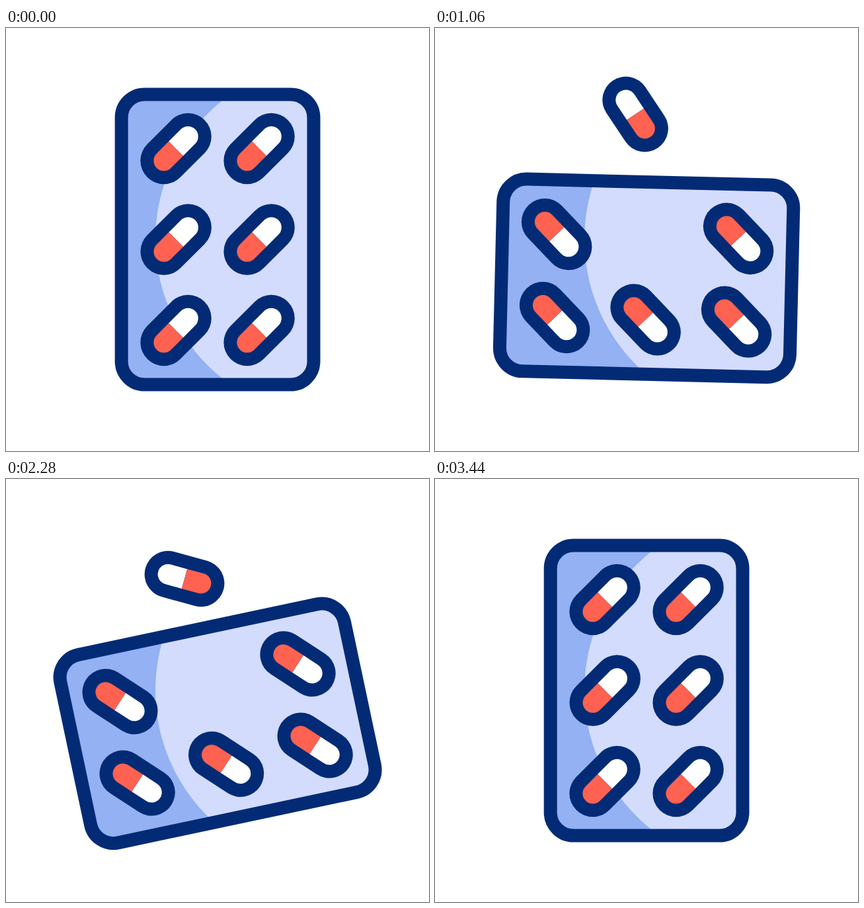
These frames come from a looping animation (640 px wide and 640 px high, 3.6 s). An HTML page:

```html
<!DOCTYPE html>
<html lang="en">
<head>
<meta charset="utf-8">
<title>Pill pack</title>
<style>
  html, body { margin: 0; width: 100%; height: 100%; overflow: hidden; background: #fff; }
  svg { display: block; width: 100vw; height: 100vh; }
</style>
</head>
<body>
<svg viewBox="0 0 640 640">
  <defs>
    <clipPath id="inside">
      <rect id="clip" x="-145.4" y="-219.6" width="290.8" height="439.2" rx="35"/>
    </clipPath>
    <g id="pill">
      <path d="M0-25.9V25.9" stroke="#032b75" stroke-width="70.8" stroke-linecap="round"/>
      <path d="M-15.4 0V-25.9A15.4 15.4 0 0 1 15.4-25.9V0Z" fill="#fff"/>
      <path d="M-15.4 0V25.9A15.4 15.4 0 0 0 15.4 25.9V0Z" fill="#ff6250"/>
    </g>
  </defs>
  <g clip-path="url(#inside)">
    <rect width="640" height="640" fill="#93b1f3"/>
    <circle cx="494.6" cy="320" r="268.6" fill="#d3dcfd"/>
  </g>
  <g id="pack">
    <rect x="-145.4" y="-219.6" width="290.8" height="439.2" rx="35" fill="none" stroke="#032b75" stroke-width="20"/>
  </g>
  <g id="rays" stroke="#ffcb50" stroke-width="21" stroke-linecap="round"></g>
  <use id="hero" href="#pill"/>
</svg>
<script>
const NS = 'http://www.w3.org/2000/svg';
const LOOP = 3600;
const $ = id => document.getElementById(id);

function add(parent, tag, attrs) {
  const el = document.createElementNS(NS, tag);
  for (const k in attrs) el.setAttribute(k, attrs[k]);
  return parent.appendChild(el);
}

// The five pills that stay in the pack
for (const y of [-137.5, 0, 137.5]) {
  for (const x of [-63, 63]) {
    if (x < 0 && y === 0) continue;
    add($('pack'), 'use', { href: '#pill', transform: `translate(${x} ${y}) rotate(45)` });
  }
}

// Rays: inner point, outer point
const rays = [
  [255, 86, 193, 48],
  [262, 126, 237, 135.4],
  [375, 99, 450.5, 64.4],
  [415.7, 132.3, 479, 162.4]
].map(pts => ({ pts, el: add($('rays'), 'line', {}) }));

const part = (t, a, b) => Math.min(1, Math.max(0, (t - a) / (b - a)));
const mix = (a, b, k) => a + (b - a) * k;
const easeOut = (u, power) => 1 - Math.pow(1 - u, power);

// Cubic easing with flat ends; x1 and x2 are the handle positions in time
function ease(u, x1, x2) {
  let lo = 0, hi = 1;
  for (let i = 0; i < 30; i++) {
    const s = (lo + hi) / 2, r = 1 - s;
    if (3 * x1 * s * r * r + 3 * x2 * s * s * r + s * s * s < u) lo = s;
    else hi = s;
  }
  return lo * lo * (3 - 2 * lo);
}

function progress(t) {
  return t < 1690
    ? ease(part(t, 80, 1680), 0.745, 0.086)
    : 1 - ease(part(t, 1690, 3328), 0.653, 0.192);
}

// Curve offset that is zero at p = 0
function bend(p, a, b, c, d) {
  const u = p - 0.0755, v = p - 0.333, w = p - 0.507;
  return p * (a + u * (b + v * (c + w * d)));
}

function draw(t) {
  const p = progress(t);
  const place = `translate(320.1 ${320 + 65.4 * p}) rotate(${102.3 * p})`;
  $('pack').setAttribute('transform', place);
  $('clip').setAttribute('transform', place);

  const x = 257.2 + bend(p, -216, 328, 77.6, -205.7);
  const y = 320 + bend(p, -92.7, -421.4, 648.9, -408);
  $('hero').setAttribute('transform', `translate(${x} ${y}) rotate(${45 + 315 * p})`);

  $('rays').setAttribute('visibility', t > 1200 && t < 1750 ? 'visible' : 'hidden');
  const head = easeOut(part(t, 1200, 1740), 2);
  const tail = easeOut(part(t, 1300, 1750), 1.365);
  for (const { pts: [x1, y1, x2, y2], el } of rays) {
    el.setAttribute('x1', mix(x1, x2, tail));
    el.setAttribute('y1', mix(y1, y2, tail));
    el.setAttribute('x2', mix(x1, x2, head));
    el.setAttribute('y2', mix(y1, y2, head));
  }
}

const start = performance.now();
function tick() {
  draw((performance.now() - start) % LOOP);
  requestAnimationFrame(tick);
}
draw(0);
requestAnimationFrame(tick);
</script>
</body>
</html>
```
